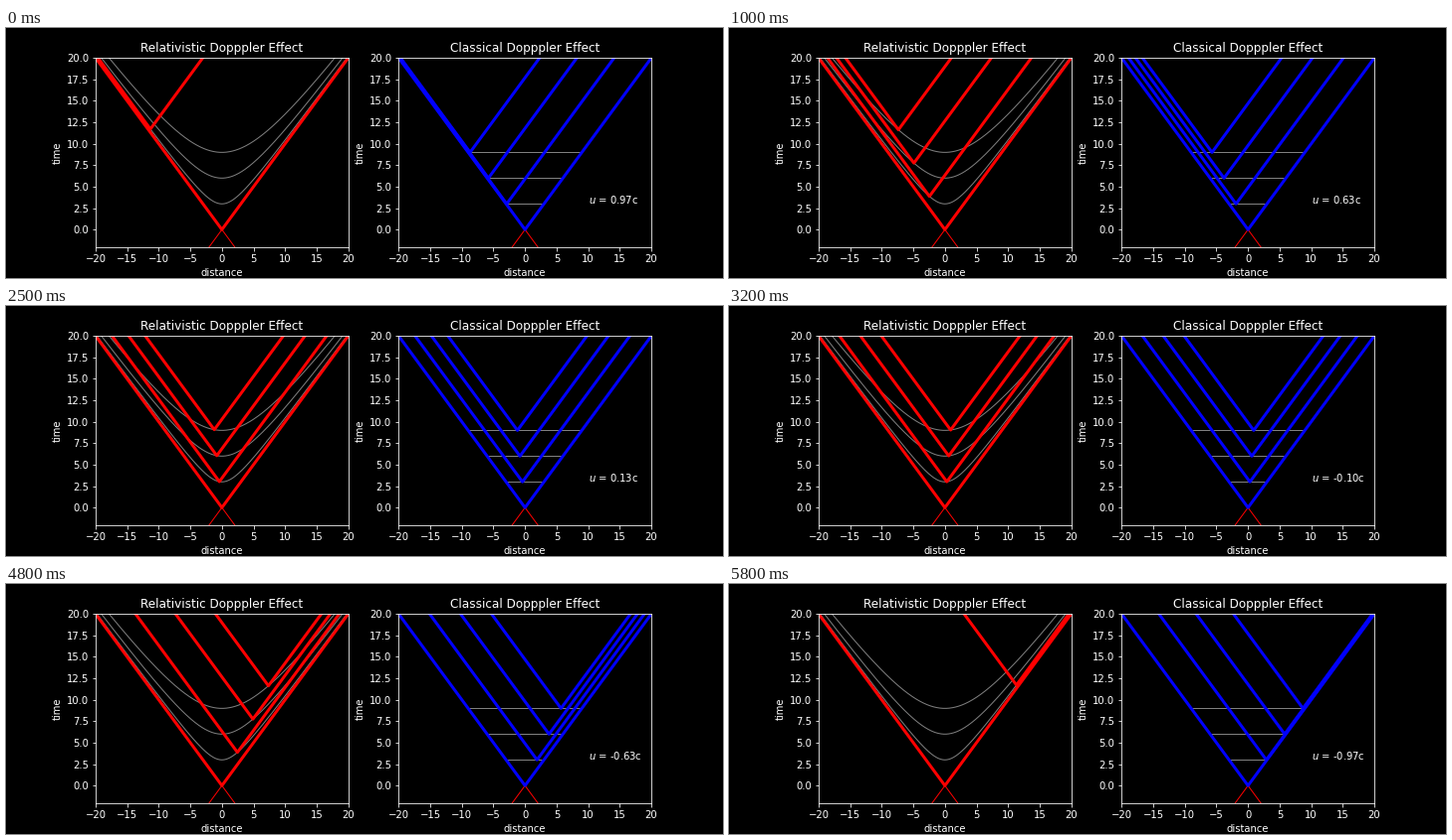
A matplotlib script that plays this animation: 720 px wide and 252 px high, repeating every 5.9 s.

```python
import numpy as np
import matplotlib.pyplot as plt
from matplotlib.animation import FuncAnimation

FRAMES = 59
PERIODS = (3, 6, 9)
REACH = 30

plt.style.use("dark_background")
plt.rcParams.update({"font.family": "DejaVu Sans", "font.size": 10})

fig, axes = plt.subplots(1, 2, figsize=(10, 3.5), dpi=72)
fig.subplots_adjust(left=0.125, right=0.9, bottom=0.125, top=0.88, wspace=0.2)
rel_ax, cls_ax = axes


def flash(x, t):
    """World lines of light leaving (x, t) in both directions."""
    return [x - REACH, x, x + REACH], [t + REACH, t, t + REACH]


def setup(ax, title, color):
    ax.set(title=title, xlabel="distance", ylabel="time",
           xlim=(-20, 20), ylim=(-2, 20))
    for slope in (-1, 1):
        ax.plot([-20, 20], [-20 * slope, 20 * slope], color="red", lw=1)
    ax.plot(*flash(0, 0), color=color, lw=3)
    return [ax.plot([], [], color=color, lw=3)[0] for _ in PERIODS]


x = np.linspace(-20, 20, 401)
for p in PERIODS:
    rel_ax.plot(x, np.sqrt(p**2 + x**2), color="gray", lw=1)
    cls_ax.plot([-p, p], [p, p], color="gray", lw=1)

rel_rays = setup(rel_ax, "Relativistic Dopppler Effect", "red")
cls_rays = setup(cls_ax, "Classical Dopppler Effect", "blue")
label = cls_ax.text(10, 3, "")


def update(i):
    u = (FRAMES // 2 - i) / 30
    gamma = 1 / np.sqrt(1 - u**2)
    for p, rel, cls in zip(PERIODS, rel_rays, cls_rays):
        rel.set_data(*flash(-u * gamma * p, gamma * p))
        cls.set_data(*flash(-u * p, p))
    label.set_text(f"$u$ = {u:.2f}c")
    return *rel_rays, *cls_rays, label


anim = FuncAnimation(fig, update, frames=FRAMES, interval=100,
                     repeat=True, repeat_delay=0)
plt.show()
```
